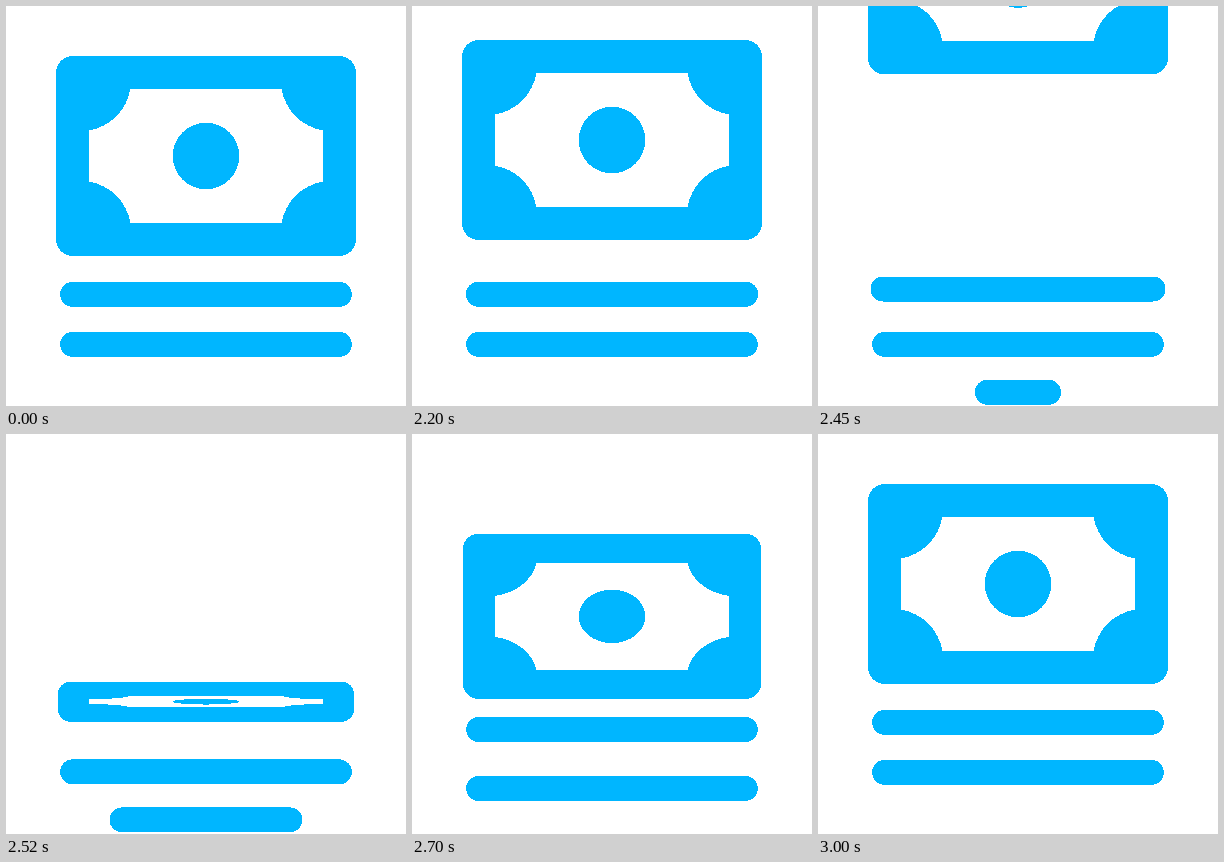
An HTML page that plays this animation: 400 px wide and 400 px high, repeating every 3.02 s.

```html
<!DOCTYPE html>
<html lang="en">
<head>
<meta charset="utf-8">
<title>Banknotes</title>
<style>
  html, body { margin: 0; width: 100%; height: 100%; overflow: hidden; background: #fff; }
  svg { display: block; width: 100%; height: 100%; fill: #00b6ff; shape-rendering: crispEdges; }
</style>
</head>
<body>
<svg viewBox="0 0 400 400">
  <defs>
    <g id="face">
      <path fill="#fff" d="M-75.7-66.67H75.7A50 50 0 0 0 116.67-25.7V25.7A50 50 0 0 0 75.7 66.67H-75.7A50 50 0 0 0-116.67 25.7V-25.7A50 50 0 0 0-75.7-66.67Z"/>
      <circle r="33.33"/>
    </g>
  </defs>
  <g id="leaving">
    <rect x="50" y="50" width="300" height="200" rx="16.67"/>
    <use href="#face" transform="translate(200 150)"/>
  </g>
  <rect id="card"/>
  <use id="cardFace" href="#face"/>
  <rect id="middle"/>
  <rect id="last"/>
</svg>
<script>
  const LOOP = 3020;
  const [leaving, card, cardFace, middle, last] =
    ['leaving', 'card', 'cardFace', 'middle', 'last'].map(id => document.getElementById(id));

  const span = (t, from, to) => Math.min(1, Math.max(0, (t - from) / (to - from)));
  const mix = (a, b, p) => a + (b - a) * p;
  const easeIn = (p, n) => p ** n;
  const easeOut = (p, n) => 1 - (1 - p) ** n;
  const easeInOut = p => p < 0.5 ? 2 * p * p : 1 - 2 * (1 - p) ** 2;

  const show = (el, on) => el.setAttribute('visibility', on ? 'visible' : 'hidden');

  // Rounded box centred on x = 200
  function box(el, half, top, bottom, r) {
    const attrs = { x: 200 - half, y: top, width: half * 2, height: bottom - top, rx: r, ry: r };
    for (const name in attrs) el.setAttribute(name, attrs[name].toFixed(3));
  }
  const bar = (el, half, y) => box(el, half, y - 12.5, y + 12.5, 12.5);

  function draw(t) {
    // The front note leaves through the top
    const out = span(t, 2000, 2500);
    leaving.setAttribute('transform', `translate(0 ${-249 * easeIn(out, 3)})`);
    show(leaving, out < 1);

    // The first bar lifts, then unfolds into the next note
    const lift = 9 * easeIn(out, 5);
    const top = mix(275.83 - lift, 50, easeOut(span(t, 2510, 3000), 3));
    const bottom = mix(300.83 - lift, 250, easeOut(span(t, 2500, 3000), 2));
    const widen = easeInOut(span(t, 2000, 3000));
    const open = (bottom - top - 25) / 175;
    box(card, mix(145.83, 150, widen), top, bottom, mix(12.5, 16.67, open));
    cardFace.setAttribute('transform', `translate(200 ${(top + bottom) / 2}) scale(1 ${open})`);
    show(cardFace, open > 0.001);

    // The second bar takes the first one's place
    bar(middle, 145.83, mix(338.33, 288.33, easeOut(span(t, 2524, 2983), 4)));

    // A new bar grows from its centre and follows
    const grow = easeInOut(span(t, 2340, 2665));
    bar(last, 12.5 + 133.33 * grow, mix(386.2, 338.33, easeInOut(span(t, 2506, 2835))));
    show(last, grow > 0);
  }

  // Pose advances every 25 ms, shown on 20/30 ms beats
  function pose(ms) {
    if (ms < 2020) return 0;
    return Math.floor(ms / 50) * 50 + (ms % 50 >= 20 ? 25 : 0);
  }

  const start = performance.now();
  function tick() {
    const t = pose((performance.now() - start) % LOOP);
    // At rest the second and third bars close the loop seamlessly
    draw(t);
    requestAnimationFrame(tick);
  }
  tick();
</script>
</body>
</html>
```
